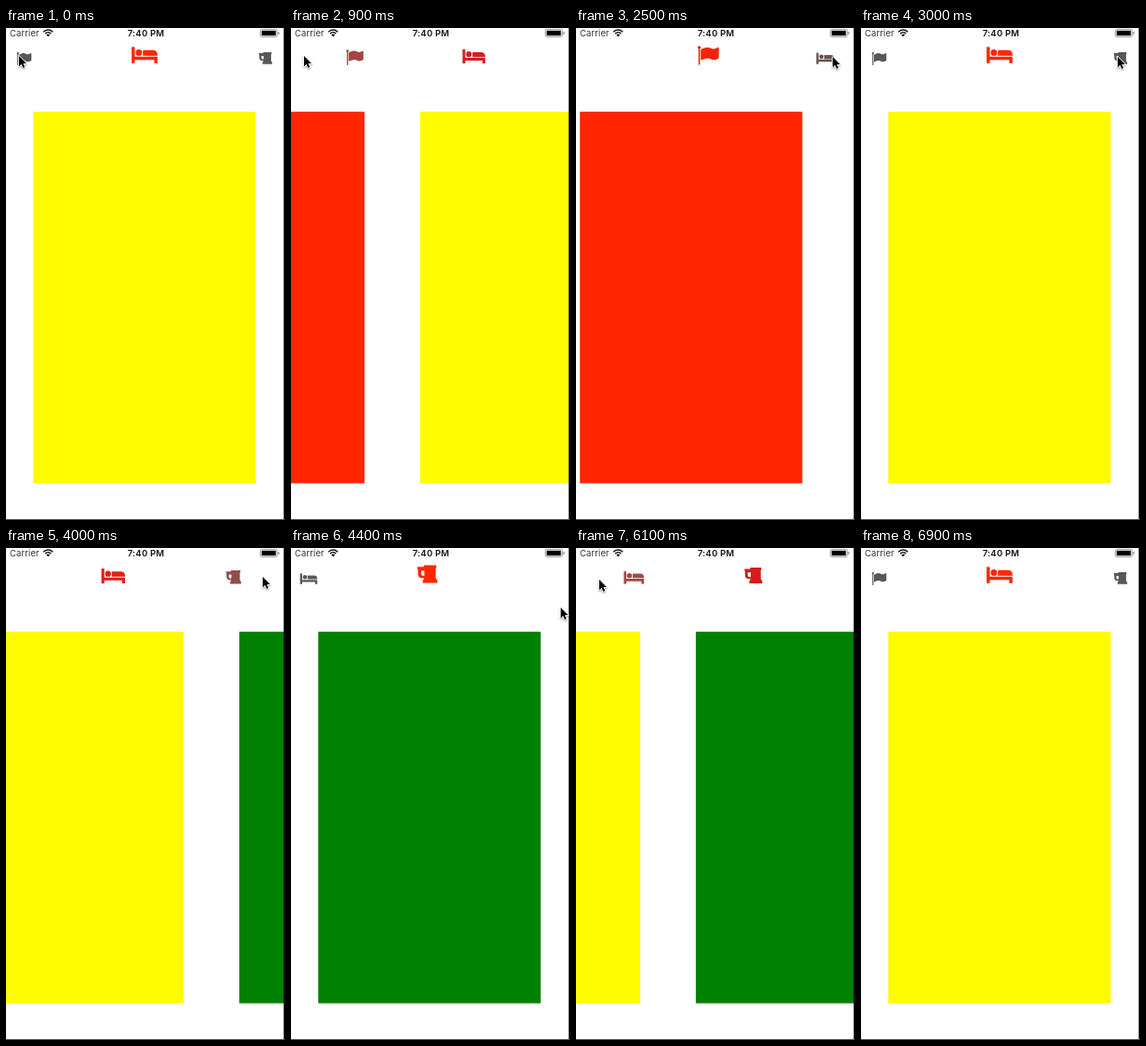
An HTML page with a canvas for the animation above (8 s loop, 300x528 px).

```html
<!DOCTYPE html>
<html lang="en">
<head>
<meta charset="utf-8">
<title>Swipe pages</title>
<style>
  html, body { margin: 0; width: 100%; height: 100%; overflow: hidden; background: #fff; }
  canvas { display: block; width: 300px; height: 528px; }
</style>
</head>
<body>
<canvas id="stage"></canvas>
<script>
const W = 300, H = 528, LOOP = 8000, STEP = 100;
const canvas = document.getElementById('stage');
const ctx = canvas.getContext('2d');
const dpr = window.devicePixelRatio || 1;
canvas.width = W * dpr;
canvas.height = H * dpr;

const PAGE_GAP = 299, SCROLL_MS = 600, ICON_UNIT = 0.87;
const FONT = 'Inter, Roboto, sans-serif';

// Each page: colour, icon path with its centre, and the icon's place when selected and beside.
const pages = [
  {
    color: '#ff2600', cx: 14.5, cy: 14, x: 153.5, y: 29, sideY: 33, travel: 134,
    icon: 'M5 4q0 1.1-1 1.7V25.5q0 .5-.5 .5h-1q-.5 0-.5-.5V5.7Q1 5.1 1 4a2 2 0 1 1 4 0z' +
      'M28 5v12q0 .7-.8 1-3.4 1.8-5.8 1.8c-2.8 0-4.2-2.2-7.7-2.2q-3 0-7.2 2.2Q5 20.2 5 18.8' +
      'V7.2Q5 6.5 6.7 5.7 10.5 3.8 13.3 3.8q2.4 0 6.5 1.9c3 1.3 5.6-1.9 7.2-1.9q1 0 1 1.2z'
  },
  {
    color: '#fffb00', cx: 16, cy: 14, x: 149, y: 29, sideY: 33, travel: 130,
    icon: 'M4 16h27q1 0 1 1v7h-4v-4H4v4H0V5q0-1 1-1h2q1 0 1 1z' +
      'M13 11a4 4 0 1 0-8 0a4 4 0 1 0 8 0zM32 15v-1q0-6-6-6H15q-1 0-1 1v6z'
  },
  {
    color: '#008000', cx: 13.5, cy: 12, x: 146.5, y: 28, sideY: 32.3, travel: 132.5,
    icon: 'M10 14V8H6v4q0 2 2 2zM26 20v3H8v-3l2-3H8q-6 0-6-6V6L1 5 1.5 3H9l.5-2h15l.5 3-1 .5V17z'
  }
];
for (const page of pages) page.path = new Path2D(page.icon);

const tints = [[88, 88, 88], [160, 74, 74], [212, 30, 30], [255, 38, 0]];

// start time, from page, to page
const scrolls = [[654, 1, 0], [2393, 0, 1], [3800, 1, 2], [5868, 2, 1]];

// time, x, y of the pointer tip
const pointerKeys = [
  [0, 14, 30], [1600, 14, 30], [1900, 140, 42], [2200, 276, 31],
  [4200, 276, 31], [4400, 290, 64], [4700, 245, 54], [5000, 120, 28],
  [5200, 40, 20], [5300, 17, 28], [5400, 25, 34],
  [6400, 25, 34], [6600, -14, 38]
];
const POINTER_END = 6700;
const arrow = new Path2D('M0 0V11.2L2.6 8.8 4.3 12.7 6.2 11.9 4.5 8.1H8z');

const clamp = v => Math.min(1, Math.max(0, v));
const lerp = (a, b, k) => a + (b - a) * k;
const ease = k => k * k * (3 - 2 * k);

function pageAt(t) {
  let pos = 1;
  for (const [start, from, to] of scrolls) {
    if (t >= start) pos = lerp(from, to, ease(clamp((t - start) / SCROLL_MS)));
  }
  return pos;
}

function pointerAt(t) {
  const next = pointerKeys.findIndex(key => key[0] > t);
  if (next < 0) return pointerKeys[pointerKeys.length - 1].slice(1);
  const [t0, x0, y0] = pointerKeys[next - 1];
  const [t1, x1, y1] = pointerKeys[next];
  const k = (t - t0) / (t1 - t0);
  return [lerp(x0, x1, k), lerp(y0, y1, k)];
}

function tint(k) {
  const i = Math.min(2, Math.floor(k * 3));
  const rgb = tints[i].map((v, n) => Math.round(lerp(v, tints[i + 1][n], k * 3 - i)));
  return `rgb(${rgb})`;
}

function rect(x, y, w, h, color) {
  ctx.fillStyle = color;
  ctx.fillRect(x, y, w, h);
}

function drawIcon(page, offset) {
  const near = clamp(1 - Math.abs(offset));
  const scale = ICON_UNIT * lerp(2 / 3, 1, near);
  ctx.save();
  ctx.translate(page.x + offset * page.travel, lerp(page.sideY, page.y, near));
  ctx.scale(scale, scale);
  ctx.translate(-page.cx, -page.cy);
  ctx.fillStyle = tint(near);
  ctx.fill(page.path, 'evenodd');
  ctx.restore();
}

function label(text, x, align, weight, color, spacing) {
  ctx.font = `${weight} 9.5px ${FONT}`;
  ctx.letterSpacing = spacing;
  ctx.textAlign = align;
  ctx.fillStyle = color;
  ctx.fillText(text, x, 9.3);
}

function drawStatus() {
  label('Carrier', 4, 'left', 400, '#333', '0.1px');
  label('7:40 PM', 150.5, 'center', 600, '#111', '0.2px');

  // wifi
  ctx.strokeStyle = ctx.fillStyle = '#111';
  ctx.lineWidth = 1.5;
  for (const r of [4.2, 6.9]) {
    ctx.beginPath();
    ctx.arc(45.3, 9, r, -Math.PI * 0.76, -Math.PI * 0.24);
    ctx.stroke();
  }
  ctx.beginPath();
  ctx.moveTo(45.3, 9.3);
  ctx.arc(45.3, 9.3, 2.7, -Math.PI * 0.76, -Math.PI * 0.24);
  ctx.fill();

  // battery
  ctx.strokeStyle = '#888';
  ctx.lineWidth = 0.8;
  ctx.beginPath();
  ctx.roundRect(273.4, 1.4, 18.2, 8.2, 2);
  ctx.stroke();
  rect(274.8, 2.8, 15.4, 5.4, '#000');
  rect(292.6, 4.2, 1.2, 2.6, '#777');
}

function drawPointer(t) {
  if (t >= POINTER_END) return;
  const [x, y] = pointerAt(t);
  ctx.save();
  ctx.translate(x, y);
  ctx.lineJoin = 'round';
  ctx.lineWidth = 1.6;
  ctx.strokeStyle = '#fff';
  ctx.shadowColor = 'rgba(0,0,0,.4)';
  ctx.shadowBlur = 2 * dpr;
  ctx.shadowOffsetY = dpr;
  ctx.stroke(arrow);
  ctx.shadowColor = 'transparent';
  ctx.fillStyle = '#000';
  ctx.fill(arrow);
  ctx.restore();
}

function draw(t) {
  const pos = pageAt(t);
  ctx.setTransform(dpr, 0, 0, dpr, 0, 0);
  rect(0, 0, W, H, '#fff');
  pages.forEach((page, i) => {
    rect(29.3 + (i - pos) * PAGE_GAP, 89.8, 239.2, 398.8, page.color);
    drawIcon(page, i - pos);
  });
  drawStatus();
  rect(298.6, 0, 1.4, H, '#000');
  rect(0, 527, W, 1, '#555');
  drawPointer(t);
}

const began = performance.now();
function tick() {
  const t = (performance.now() - began + 8) % LOOP;
  draw(Math.floor(t / STEP) * STEP);
  requestAnimationFrame(tick);
}
tick();
</script>
</body>
</html>
```
